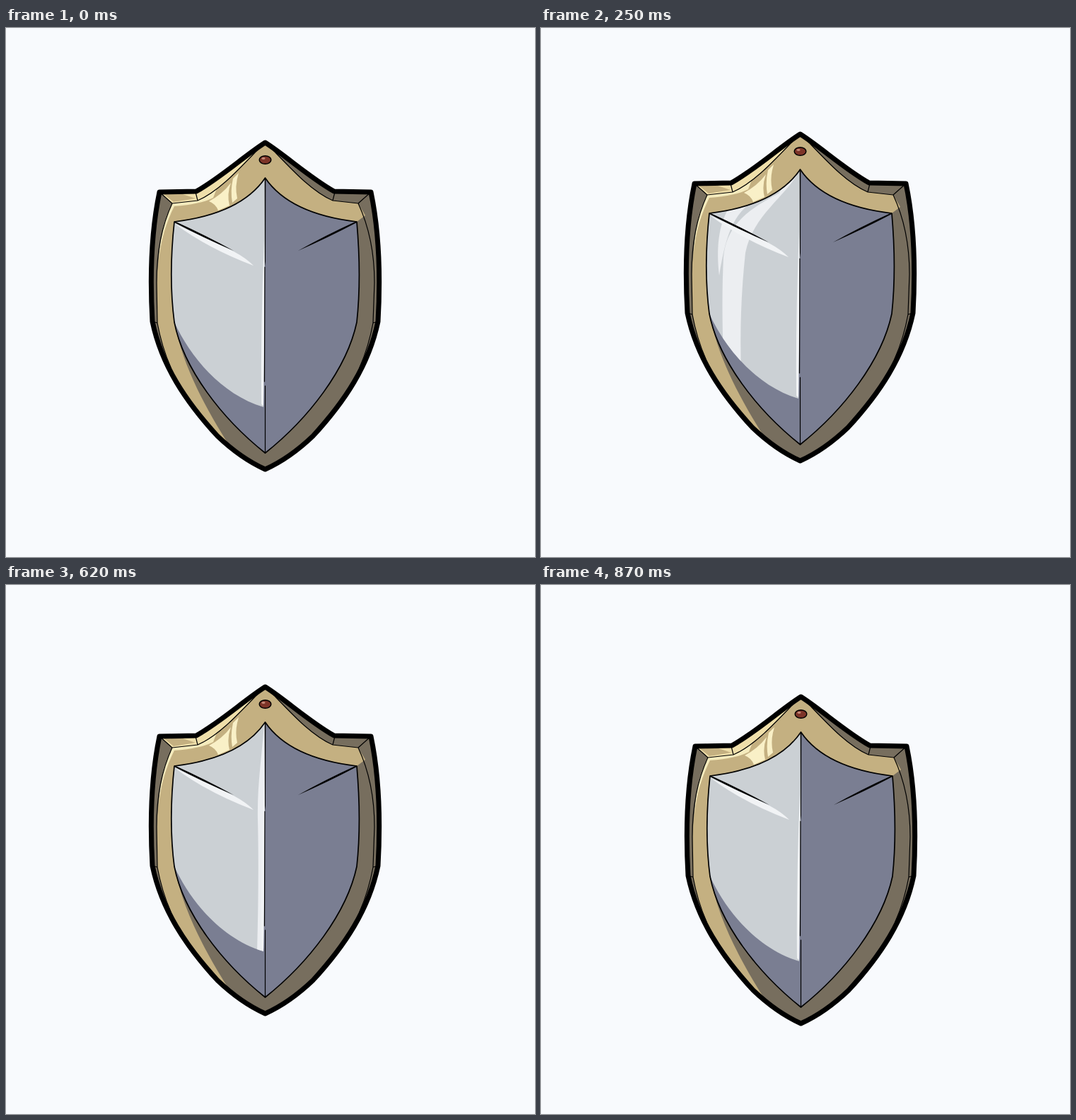
Animation, 748 px wide and 748 px high, one loop 1 s. Source, as an HTML page:

```html
<!DOCTYPE html>
<html lang="en">
<head>
<meta charset="utf-8">
<title>Shield</title>
<style>
  html, body { margin: 0; width: 100%; height: 100%; overflow: hidden; background: #f8fafd; }
  svg { display: block; width: 100vw; height: 100vh; }
  .shield { animation: bob 1s step-end infinite; }
  .sheen { fill: #eceef1; animation: sweep 1s step-end infinite; }
  .line { fill: none; stroke: #000; stroke-linecap: round; stroke-linejoin: round; }

  @keyframes bob {
    0%  { transform: translate(0, 0); }
    12% { transform: translate(1px, -4px); }
    25% { transform: translate(0, -12px); }
    37% { transform: translate(0, -18px); }
    50% { transform: translate(-1px, -24px); }
    62% { transform: translate(0, -18px); }
    75% { transform: translate(0, -12px); }
    87% { transform: translate(1px, -4px); }
  }
  @keyframes sweep {
    0%, 87% { d: path("M0 0"); }
    12% { d: path("M230 270 L290 264 C264 274 254 300 250 350 Q247 400 251 460 L230 420 Z"); }
    25% { d: path("M366 213 C345 252 300 276 289 330 C283 385 281 440 283 500 L258 480 Q255 400 258 336 C262 296 285 272 336 246 L346 232 Z M312 250 C274 268 262 300 252 362 C248 325 250 292 266 266 Z"); }
    37% { d: path("M366 216 C360 258 333 282 329 335 Q324 420 326 525 L294 500 Q296 420 293 350 C297 300 334 272 353 224 Z M326 246 C294 276 285 300 290 396 C277 345 272 304 296 262 Z"); }
    50% { d: path("M367 211 L366 540 L335 526 Q337 430 331 370 C326 310 350 286 360 218 Z"); }
    62% { d: path("M367 211 L366 540 L355 536 Q358 430 356 350 C355 300 362 260 365 213 Z"); }
    75% { d: path("M367 211 L366 540 L358 536 Q360 400 362 300 L365 213 Z"); }
  }
</style>
</head>
<body>
<svg viewBox="0 0 748 748">
  <defs>
    <path id="body" d="M366.5 162 C338 180 303 212 269 231 L217 232 C207 280 203 345 207 415 C220 477 254 528 299 577 C320 597 342 613 366.5 624 C391 613 413 597 434 577 C479 528 513 477 526 415 C530 345 526 280 516 232 L464 231 C430 212 395 180 366.5 162 Z"/>
    <path id="panel" d="M366.5 212 C342 248 296 267 238 274 C233 320 232 370 238 416 C251 482 305 552 366.5 601 C428 552 482 482 496 416 C501 370 500 320 496 274 C437 267 391 248 366.5 212 Z"/>
    <path id="lit" d="M366.5 212 C342 248 296 267 238 274 C233 320 232 370 238 416 C260 464 304 518 364 536 L366 330 Z"/>
    <clipPath id="inBody"><use href="#body"/></clipPath>
    <clipPath id="inLit"><use href="#lit"/></clipPath>
  </defs>
  <rect width="748" height="748" fill="#f8fafd"/>

  <g class="shield">
    <use href="#body" fill="#776e5e"/>

    <g clip-path="url(#inBody)">
      <path fill="#c4b081" d="M366.5 160 L377 172 C404 200 432 231 462 244 L498 248 L508 265 L496 274 L366 300 L240 300 L238 416 C251 482 284 540 318 594 L290 574 C258 538 226 482 214 417 Q208 310 235 248 L271 244 C301 231 329 200 356 172 Z"/>
      <path fill="#efdfaa" d="M217 231 L269 231 L272 244 L235 248 Z M269 230 L366 162 L356 172 C329 200 301 231 271 244 Z"/>
      <path fill="#c4b081" d="M222 234 L250 235 L268 241 L237 246 Z"/>
      <path fill="#f5ebbd" d="M235 248 L271 244 Q284 239 298 227 L293 240 Q276 249 238 252 C227 274 219 298 216 330 Q218 280 235 248 Z"/>
      <path fill="#f9f0c7" d="M287 245 Q306 235 318 219 Q312 235 316 251 L300 258 Q297 249 287 245 Z M321 213 L329 205 Q323 224 327 241 L320 247 Q317 230 321 213 Z"/>
    </g>

    <use href="#panel" fill="#7a7e92"/>
    <use href="#lit" fill="#cbd0d4"/>
    <g clip-path="url(#inLit)">
      <path class="sheen" d="M0 0"/>
      <path fill="#f1f3f5" d="M239 277 L322 316 Q339 325 350 336 Q286 312 239 277 Z M365 300 L366 536 L361 532 Q360 420 365 300 Z"/>
    </g>

    <path d="M238 273 Q284 294 322 315 Q280 297 238 275 Z M496 273 Q450 294 413 315 Q454 297 496 275 Z M365.7 212 H367.3 L367 330 L366 338 Z"/>
    <g class="line" stroke-width="1.2">
      <use href="#panel" stroke-width="1.7"/>
      <path d="M366 338 L365.500 500 M366.500 506 V600"/>
      <path d="M217 232 L235 248 L271 244 C301 231 329 200 356 172 M268 232 L271 244 M235 248 C221 278 213 315 213 360 L214 417 Q220 450 233 480 M207 415 L214 417"/>
      <path d="M516 232 L498 248 L462 244 C432 231 404 200 377 172 M465 232 L462 244 M498 248 C512 278 521 315 521 360 L519 417 Q513 450 500 480 M526 415 L519 417"/>
    </g>
    <use href="#body" class="line" stroke-width="7"/>

    <ellipse cx="366.5" cy="186.500" rx="8.300" ry="5.800" fill="#7d3428" stroke="#000" stroke-width="1.500"/>
    <ellipse cx="364" cy="184.500" rx="2.600" ry="1.400" fill="#c58a79"/>
  </g>
</svg>
</body>
</html>
```
